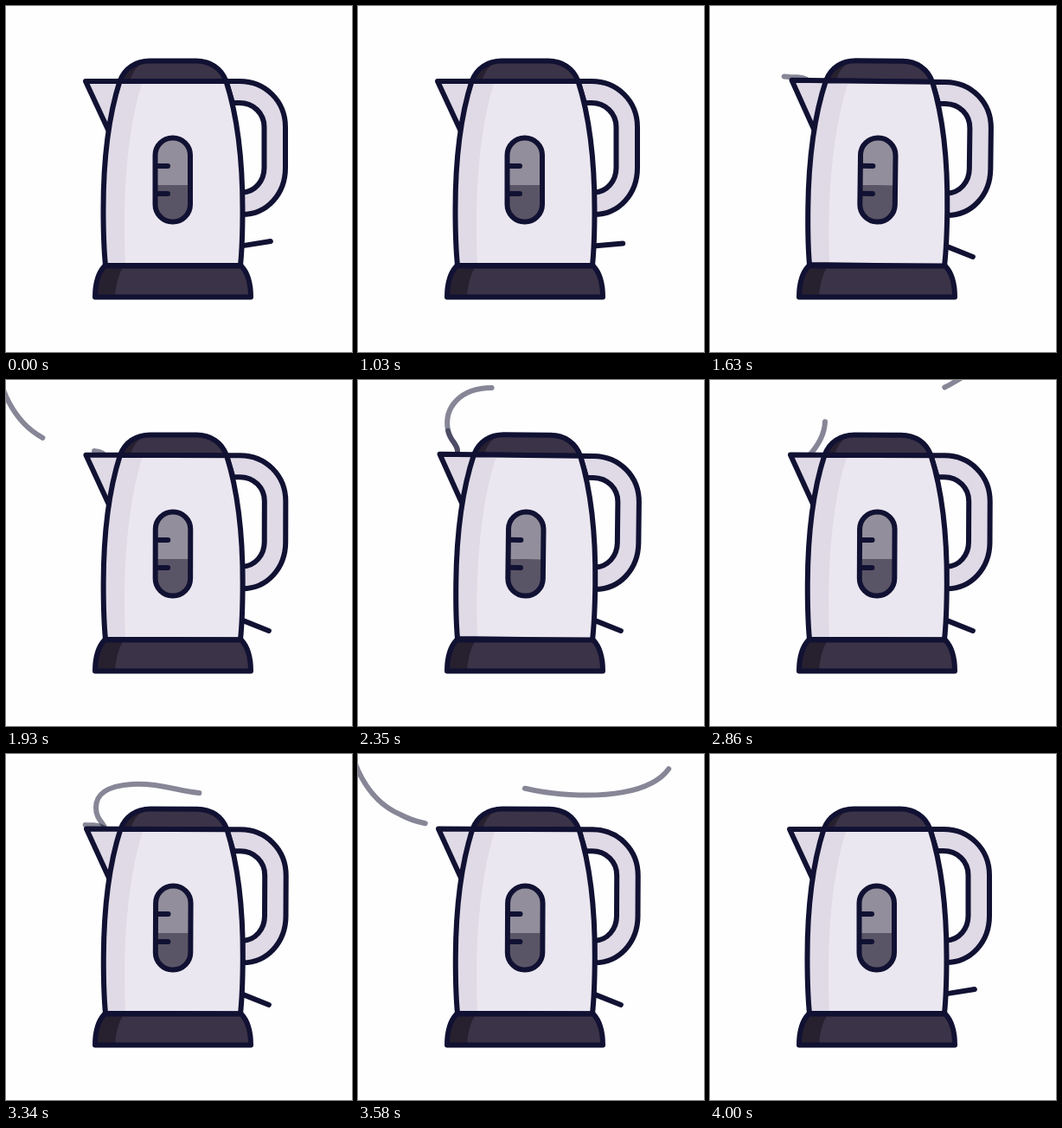
An HTML page that plays this animation: 400 by 400 pixels, repeating every 4660 ms.

```html
<!DOCTYPE html>
<html lang="en">
<head>
<meta charset="utf-8">
<title>Kettle</title>
<style>
  html, body { margin: 0; width: 100%; height: 100%; overflow: hidden; background: #fefefe; }
  svg { display: block; width: 100%; height: 100%; }
  .line { fill: none; stroke: #111133; stroke-width: 6; stroke-linecap: round; stroke-linejoin: round; }
  .steam { opacity: .5; }
  .light { fill: #ebe7f0; }
  .shade { fill: #dfdae6; }
  .dark { fill: #3b3347; }
  .deep { fill: #27202f; }
</style>
</head>
<body>
<svg viewBox="0 0 400 400">
  <defs>
    <path id="body" d="M131.5 87C119 126 112.5 180 112.5 235C112.5 258 113 280 115 300H271C273 280 273.5 258 273.5 235C273.5 180 267 126 254.5 87Z"/>
    <path id="lid" d="M131.5 87C137 72 150 63.5 166 63.5H220C236 63.5 249 72 254.5 87Z"/>
    <path id="base" d="M103 336.500H283C283 321 279 308 272 300.500H114C107 308 103 321 103 336.500Z"/>
    <path id="handle" d="M254.500 87H270C300 87 323 110 323 140V187C323 217 302 241 273 241V215.500C288 215 298.500 202 298.500 187V140C298.500 124 286 112 270 112H262Z"/>
    <rect id="pane" x="172.500" y="152.500" width="40.500" height="97" rx="20"/>
    <clipPath id="inBody"><use href="#body"/></clipPath>
    <clipPath id="inLid"><use href="#lid"/></clipPath>
    <clipPath id="inBase"><use href="#base"/></clipPath>
    <clipPath id="inPane"><use href="#pane"/></clipPath>
  </defs>

  <g id="vapour"></g>
  <path id="lever" class="line" d="M272.300 277.400h34"/>

  <g id="kettle">
    <use href="#handle" class="shade"/>
    <use href="#handle" class="line"/>
    <path class="shade" d="M132 87H92L119 145Z"/>
    <path class="line" d="M132 87H92L118.500 144"/>
    <use href="#lid" class="dark"/>
    <path class="deep" clip-path="url(#inLid)" d="M120 60H170C156 64 147 73 143 87H120Z"/>
    <use href="#lid" class="line"/>
    <use href="#body" class="light"/>
    <path class="shade" clip-path="url(#inBody)" d="M100 87H158C142 135 134 210 138 300H100Z"/>
    <use href="#body" class="line"/>
    <g clip-path="url(#inPane)">
      <path fill="#928e9b" d="M170 150h46v57h-46z"/>
      <path fill="#5a5566" d="M170 207h46v45h-46z"/>
    </g>
    <path class="line" d="M173 185h14M173 217h14"/>
    <use href="#pane" class="line"/>
  </g>

  <use href="#base" class="dark"/>
  <path class="deep" clip-path="url(#inBase)" d="M100 300H137C130 309 127 322 126 337H100Z"/>
  <use href="#base" class="line"/>
</svg>
<script>
  const LOOP = 4660, STEP = 30, SPEED = 0.6;
  const BOIL = [1570, 4000];
  const UP = -9.1, DOWN = 21.7, KICK = 8.5;
  const $ = id => document.getElementById(id);

  const left = 'M118 92C114 82 102 82 92 82C75 81 60 76 49 70C30 62 12 45 0 19C-3 12 -6 4 -8 -8';
  const leftUp = 'M118 92C114 83 106 82 100 82C65 79 48 55 42 18C40 8 40 4 42 -8';
  const curl = 'M115 92V82C115 74 106 70 104 58C99 32 118 9 155 9C195 9 230 32 278 5L300 -8';
  const rise = 'M114 88C124 77 133 62 133 47C133 22 85 32 85 -8';
  const sweep = 'M116 92C116 80 104 78 104 62C104 45 118 37 145 35C175 33 200 43 223 45C300 54 367 40 367 -8';

  // path, start time, length of the wisp
  const wisps = [
    [left, 1570, 134],
    [leftUp, 1897, 130],
    [curl, 2153, 125],
    [curl, 2290, 105],
    [rise, 2785, 90],
    [sweep, 3062, 175],
    [left, 3290, 130]
  ].map(([d, start, size]) => {
    const el = document.createElementNS('http://www.w3.org/2000/svg', 'path');
    el.setAttribute('d', d);
    el.setAttribute('class', 'line steam');
    el.setAttribute('stroke-dasharray', size + ' 2000');
    $('vapour').append(el);
    return { el, start, size, total: el.getTotalLength() };
  });

  const clamp = u => Math.min(1, Math.max(0, u));
  const smooth = u => { u = clamp(u); return u * u * (3 - 2 * u); };

  // swing past the end, then settle
  function flip(t, start, from, to, kick) {
    const over = to + kick;
    return t < start + 150
      ? from + (over - from) * smooth((t - start) / 150)
      : over - kick * smooth((t - start - 150) / 180);
  }

  function leverAngle(t) {
    return t < 3670 ? flip(t, 1000, UP, DOWN, KICK) : flip(t, 3670, DOWN, UP, -KICK);
  }

  function tilt(t) {
    if (t < BOIL[0] || t >= BOIL[1]) return 0;
    const wave = (1 - Math.cos((t - BOIL[0]) / 120 * 2 * Math.PI)) / 2;
    return 0.12 + 0.56 * wave * wave;
  }

  function draw(t) {
    $('lever').setAttribute('transform', `rotate(${leverAngle(t)} 272.3 277.4)`);
    $('kettle').setAttribute('transform', `rotate(${tilt(t)} 192 300)`);
    for (const { el, start, size, total } of wisps) {
      const head = (t - start) * SPEED;
      const shown = head > 0 && head - size < total;
      el.style.display = shown ? '' : 'none';
      el.setAttribute('stroke-dashoffset', size - head);
    }
  }

  const origin = performance.now();
  function tick() {
    const t = Math.max(0, performance.now() - origin) % LOOP;
    draw(Math.floor((t - 10) / STEP) * STEP + 10);
    requestAnimationFrame(tick);
  }
  tick();
</script>
</body>
</html>
```
